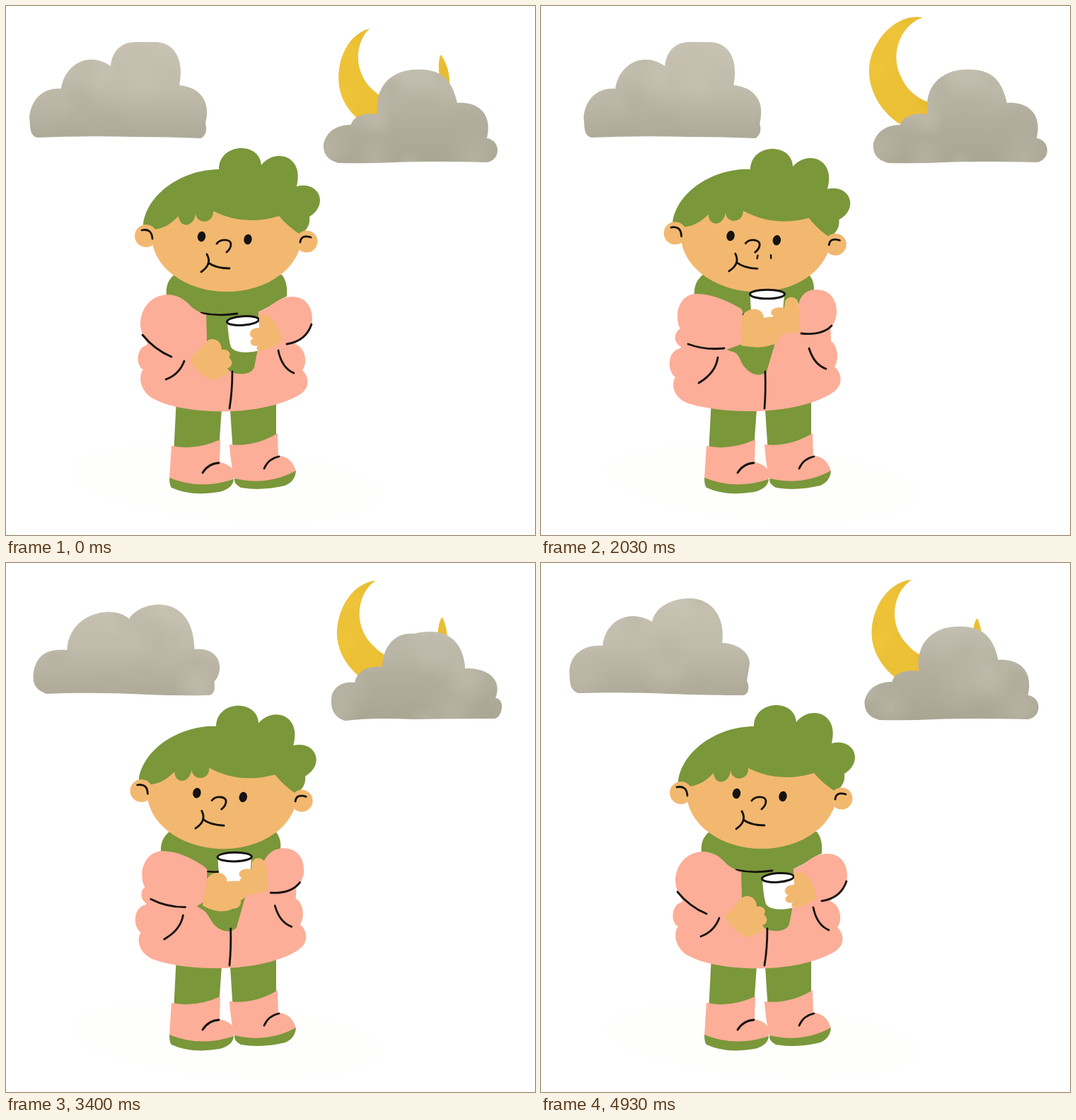
An HTML page with a canvas that plays this animation: 748x748 px, repeating every 5.01 s.

```html
<!DOCTYPE html>
<html lang="en">
<head>
<meta charset="utf-8">
<title>Warm cup</title>
<style>
  html, body { margin: 0; height: 100%; overflow: hidden; background: #fff; }
  canvas { display: block; }
</style>
</head>
<body>
<canvas width="748" height="748"></canvas>
<script>
const ctx = document.querySelector('canvas').getContext('2d');
const LOOP = 5010;
const GREEN = '#7a973a', SKIN = '#f2b870', PINK = '#fdae98', INK = '#15120f';

// Path pairs: [cup held low, cup held high]
const POSES = {
  body: [
    'M262 425 L215 460 L198 480 C184 484 183 508 194 514 C186 524 190 548 212 557 C250 577 360 583 416 549 C430 540 429 525 419 515 C427 505 424 484 409 478 L420 440 L357 430 Z',
    'M250 425 L215 460 L197 484 C178 488 178 516 190 525 C183 535 188 557 212 563 C260 577 360 580 412 547 C427 538 427 520 415 510 C423 498 418 478 410 474 L409 435 L345 430 Z'],
  tail: [
    'M283 430 L284 474 C292 485 300 500 316 516 C325 522 346 523 351 511 L357 480 L358 428 Z',
    'M285 425 L260 484 C270 492 276 484 283 503 C290 517 306 528 319 517 L333 470 L346 425 Z'],
  collar: [
    'M238 380 C228 388 226 398 227 410 C250 412 262 428 276 434 L327 437 L358 432 C380 422 390 412 397 411 C398 400 397 388 390 380 Z',
    'M229 380 C219 388 216 398 217 410 C240 412 252 428 268 434 L316 437 L346 432 C366 422 376 412 385 406 C387 398 386 388 379 380 Z'],
  collarLine: ['M276 434 Q300 439 327 435', 'M268 434 Q290 439 316 435'],
  leftArm: [
    'M230 408 C205 408 190 428 190 450 C190 456 192 462 194 466 C196 474 203 480 208 484 L235 500 L262 503 L284 472 L282 437 L266 430 C255 416 245 409 230 408 Z',
    'M218 407 C203 408 193 422 193 438 C193 446 194 452 197 456 C185 464 188 480 203 484 L235 490 L262 486 L284 478 L285 432 L283 428 C258 414 240 407 218 407 Z'],
  rightArm: [
    'M357 432 C375 428 382 411 405 411 C423 411 433 425 433 442 C433 460 415 476 397 479 L384 484 L357 484 Z',
    'M364 425 C366 408 376 401 390 401 C408 401 418 415 418 432 C418 446 411 456 400 460 L385 466 L340 466 Z'],
  cup: [
    'M313 446 C314 460 315 472 318 482 C322 490 340 492 358 487 L358 444 Z',
    'M296 408 C296 422 297 434 300 444 C304 454 330 456 341 446 L344 408 Z'],
  leftHand: [
    'M260 500 L284 474 C290 468 305 471 305 486 C314 484 320 492 315 497 C322 502 320 511 313 512 C318 520 308 526 303 524 C297 531 290 529 284 526 C275 520 266 510 260 500 Z',
    'M283 480 L284 440 C290 425 314 424 315 441 C338 436 350 444 345 452 C350 456 342 466 337 467 C338 474 333 479 326 479 C317 483 305 483 300 482 C293 482 288 481 283 480 Z'],
  rightHand: [
    'M358 440 C366 432 376 440 380 447 C385 455 388 463 390 473 C381 481 370 486 358 488 C352 485 355 482 356 480 C346 483 342 473 350 470 C341 466 344 455 358 455 Z',
    'M345 418 C350 408 362 411 364 420 C366 432 366 445 365 461 C352 462 342 463 335 466 C330 462 332 455 336 450 C328 452 322 444 329 438 C321 435 326 423 344 427 Z'],
  creases: [
    'M193 465 Q210 486 234 496 M252 502 Q245 521 226 528 M432 450 Q424 474 397 478 M385 487 Q390 512 407 519 M320 517 Q320 545 316 569',
    'M208 478 Q232 487 259 484 M250 497 Q247 519 223 533 M411 452 Q398 466 368 463 M379 484 Q386 507 403 513 M317 517 Q318 545 316 569']
};

const HAIR = 'M194 308 C200 265 250 231 301 231 C301 193 359 191 361 225 C381 200 422 212 411 255 C443 247 457 281 429 298 Q431 314 416 323 Q400 313 386 297 Q337 312 293 290 C294 308 270 310 268 293 C267 312 246 316 244 297 Q226 316 207 316 Q192 317 194 308 Z';
const FACE_LINES = 'M192 317 Q206 314 207 329 M416 334 Q417 323 431 327 M298 336 C303 329 318 329 318 337 Q318 343 312 348 M284 351 Q292 365 276 376 M286 363 Q297 371 316 371';
const LEGS = 'M241 555 L306 555 L301 627 L237 634 Z M316 555 L382 555 L382 620 L321 632 Z';
const BOOTS = 'M234 622 Q268 629 303 613 L302 645 Q319 648 323 661 L322 669 Q275 688 231 668 Z M316 620 Q352 624 384 604 L385 636 Q404 637 410 658 Q370 682 323 668 Q318 650 316 620 Z';
const SOLES = 'M231 667 Q275 685 322 669 Q321 682 302 687 Q262 694 234 681 Q231 678 231 667 Z M323 668 Q370 679 410 657 Q409 672 395 678 Q362 686 332 681 Q322 676 323 668 Z';
const BOOT_LINES = 'M278 660 Q286 647 301 646 M365 654 Q371 640 386 637';
const MOON = 'M514 32 C477 42 464 90 473 122 C485 165 540 195 585 178 C625 160 640 105 615 69 C612 72 612 82 612 90 C618 140 555 150 524 123 C490 98 492 52 514 32 Z';
const STEAM = [
  'M327 432 Q326 414 320 400 Q308 382 305 370 Q304 362 308 346',
  'M338 428 Q337 405 328 390 Q325 375 326 368 Q325 360 325 346'];

const LEFT_FLAT = 'M44 186 C32 182 35 170 33 158 C36 125 60 115 78 117 C82 85 115 62 148 85 C150 62 165 51 182 51 L212 51 C240 52 252 78 245 112 C275 115 290 135 282 166 Q286 180 276 187 Q230 185 180 185 Q110 183 44 186 Z';
const LEFT_ROUND = 'M42 184 C28 180 30 165 29 154 C30 125 55 115 76 117 C80 82 112 64 146 83 C150 62 175 50 198 50 C232 50 250 78 245 113 C270 114 288 130 283 148 L280 166 Q286 182 276 187 Q230 187 170 185 Q110 182 42 184 Z';
const LEFT_TWIN = 'M48 185 C28 178 28 165 30 152 C36 125 55 122 77 123 C79 72 140 57 165 79 C180 52 256 40 257 122 C293 118 301 150 285 168 Q288 188 275 187 Q230 188 190 186 Q110 182 48 185 Z';
const RIGHT_FLAT = 'M470 222 C450 216 449 205 449 195 C455 172 475 168 488 168 C490 155 510 150 526 153 C520 115 545 90 580 90 C620 88 632 110 638 137 C670 135 688 155 680 187 C700 190 700 218 680 221 Q600 219 550 221 Q510 223 470 222 Z';
const RIGHT_TWIN = 'M472 223 C450 216 452 195 454 185 C462 168 478 168 486 169 C490 150 508 145 525 147 C526 115 545 98 570 100 C620 88 640 115 642 149 C675 148 695 165 685 191 C699 192 695 218 684 220 Q620 220 570 221 Q510 218 472 223 Z';
const LEFT_CLOUDS = [LEFT_FLAT, LEFT_ROUND, LEFT_TWIN, LEFT_ROUND];
const RIGHT_CLOUDS = [RIGHT_FLAT, RIGHT_FLAT, RIGHT_TWIN, RIGHT_FLAT];

function mix([from, to], k) {
  const number = /[\d.]+/g, ends = to.match(number);
  let i = 0;
  return from.replace(number, v => +v + (ends[i++] - v) * k);
}

function fill(d, color) {
  ctx.fillStyle = color;
  ctx.fill(new Path2D(d));
}

function line(d, width = 2.8) {
  ctx.strokeStyle = INK;
  ctx.lineWidth = width;
  ctx.stroke(new Path2D(d));
}

function oval(x, y, rx, ry, color, turn = 0) {
  ctx.beginPath();
  ctx.ellipse(x, y, rx, ry, turn, 0, 7);
  ctx.fillStyle = color;
  ctx.fill();
}

function fade(gradient, ...colors) {
  colors.forEach((c, i) => gradient.addColorStop(i / (colors.length - 1), c));
  return gradient;
}

// Fills a shape with a vertical wash and soft seeded brush blots.
function wash(d, [x, y, w, h], colors, tints, seed) {
  const random = () => (seed = seed * 16807 % 2147483647) / 2147483647;
  ctx.save();
  ctx.clip(new Path2D(d));
  ctx.fillStyle = fade(ctx.createLinearGradient(0, y, 0, y + h), ...colors);
  ctx.fillRect(x, y, w, h);
  for (let i = 0; i < 16; i++) {
    const bx = x + w * random(), by = y + h * random(), r = 20 + 25 * random();
    const tint = tints[i % 2];
    ctx.fillStyle = fade(ctx.createRadialGradient(bx, by, 0, bx, by, r), `rgba(${tint},.3)`, `rgba(${tint},0)`);
    ctx.fillRect(bx - r, by - r, 2 * r, 2 * r);
  }
  ctx.restore();
}

function shifted(dx, dy, turn, cx, cy, draw) {
  ctx.save();
  ctx.translate(cx + dx, cy + dy);
  ctx.rotate(turn * Math.PI / 180);
  ctx.translate(-cx, -cy);
  draw();
  ctx.restore();
}

function drawSky(t) {
  const drift = 1 - Math.abs(t / 2050 % 2 - 1);
  const step = Math.floor(t / 100) % 4;
  const greys = ['206,201,187', '174,169,153'];
  shifted(-9 * drift, -8 * drift, 25 * drift, 549, 107, () =>
    wash(MOON, [460, 25, 180, 165], ['#efc63a', '#edc136', '#eac034'], ['243,203,64', '222,178,38'], 77));
  shifted(27.5 * drift, 0, 0, 0, 0, () =>
    wash(LEFT_CLOUDS[step], [25, 45, 275, 145], ['#c6c1b1', '#c0bbab', '#aea997'], greys, 31 + step));
  shifted(21 * drift, 0, 0, 0, 0, () =>
    wash(RIGHT_CLOUDS[step], [445, 88, 255, 138], ['#c4c0b1', '#b3af9f', '#a9a592'], greys, 53 + step));
}

function drawHead() {
  oval(312, 325, 106, 79, SKIN);
  fill(HAIR, GREEN);
  oval(198, 325, 16, 16, SKIN);
  oval(425, 333, 15.5, 15.5, SKIN);
  oval(276.5, 326, 5.7, 7.3, INK, 0.15);
  oval(342, 330, 5.7, 7.3, INK, 0.15);
  line(FACE_LINES);
}

function drawSteam(t) {
  if (t < 450 || t > 2200) return;
  const length = 16 * Math.sin(Math.PI * (t - 450) / 1750);
  STEAM.forEach((d, i) => {
    const middle = (17 + (t - 700) * 0.049) * (i ? 0.92 : 1);
    ctx.setLineDash([length, 999]);
    ctx.lineDashOffset = length / 2 - middle;
    line(d, 2.4);
  });
  ctx.setLineDash([]);
}

function drawPerson(t) {
  const lift = (1 - Math.cos(2 * Math.PI * t / LOOP)) / 2 / 0.914;
  const part = (name, color) => fill(mix(POSES[name], lift), color);
  const between = (a, b) => a + (b - a) * lift;

  fill(LEGS, GREEN);
  fill(BOOTS, PINK);
  fill(SOLES, GREEN);
  line(BOOT_LINES);
  part('body', PINK);
  part('tail', GREEN);
  part('collar', GREEN);
  line(mix(POSES.collarLine, lift));
  part('leftArm', PINK);
  part('rightArm', PINK);
  line(mix(POSES.creases, lift));
  shifted(-8.5 * lift, 0, 2 * lift, 306, 328, drawHead);
  drawSteam(t);
  part('cup', '#fff');
  oval(between(335, 320), between(445, 407.5), between(22.5, 24.5), 6.3, '#fff', between(-0.07, 0));
  ctx.strokeStyle = INK;
  ctx.lineWidth = 3;
  ctx.stroke();
  part('leftHand', SKIN);
  part('rightHand', SKIN);
}

const start = performance.now();

function frame() {
  const t = (performance.now() - start) % LOOP;
  ctx.lineCap = ctx.lineJoin = 'round';
  ctx.fillStyle = '#fff';
  ctx.fillRect(0, 0, 748, 748);
  oval(312, 675, 220, 52, '#fefefc', 0.08);
  drawSky(t);
  drawPerson(t);
  requestAnimationFrame(frame);
}

frame();
</script>
</body>
</html>
```
